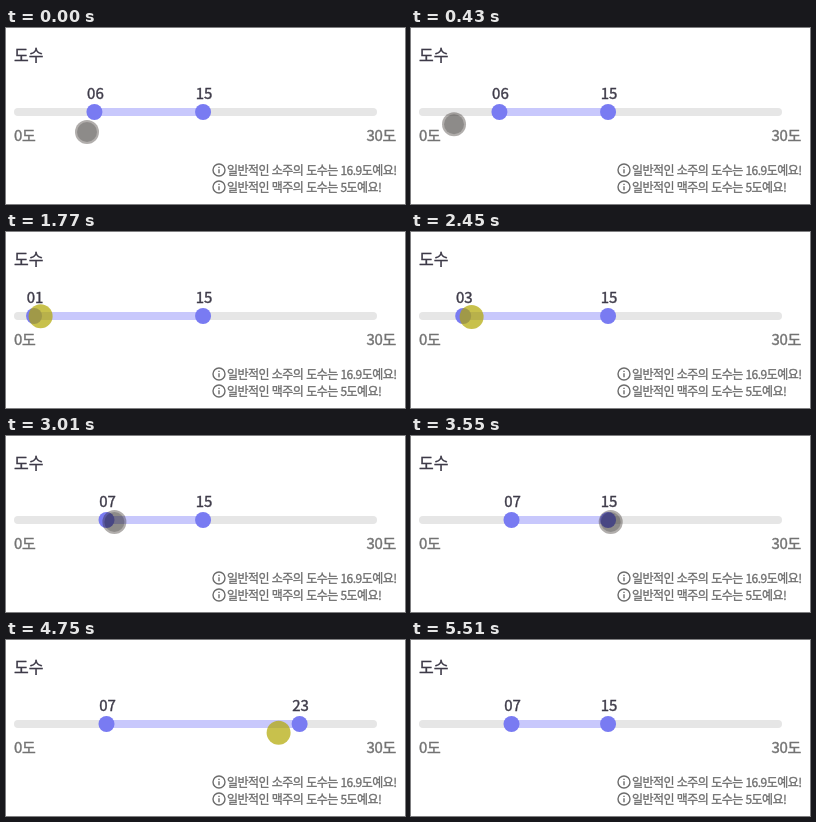
Animation of 399x176 px, one loop 6630 ms. Source, as an HTML page:

```html
<!DOCTYPE html>
<html lang="ko">
<head>
<meta charset="utf-8">
<style>
html, body { margin: 0; width: 100%; height: 100%; overflow: hidden; background: #fff; }
svg { display: block; width: 399px; height: 176px; }
text {
  font: 500 15px "Noto Sans CJK KR", "Noto Sans CJK", "Noto Sans KR", sans-serif;
  fill: #3e3b49; stroke: #3e3b49; stroke-width: .4px;
}
.title { font-size: 16px; }
.limit { fill: #737373; stroke: #737373; letter-spacing: -.02em; }
.hint text { font-size: 12px; fill: #6c6c6c; stroke: #6c6c6c; stroke-width: .3px; letter-spacing: -.045em; }
.value { text-anchor: middle; }
</style>
</head>
<body>
<svg viewBox="0 0 399 176">
  <defs>
    <g id="info" fill="none" stroke="#6c6c6c" stroke-width="1.4">
      <circle r="6"/>
      <path d="M0-.8V3.2M0-3.2V-1.9"/>
    </g>
  </defs>
  <text class="title" x="8" y="32.5">도수</text>
  <rect x="8" y="80" width="363" height="8" rx="4" fill="#e6e6e6"/>
  <rect id="range" y="80" height="8" fill="#c8c8fc"/>
  <g fill="#797bf2">
    <circle id="minThumb" cy="84" r="8"/>
    <circle id="maxThumb" cy="84" r="8"/>
  </g>
  <text id="minText" class="value" y="71"></text>
  <text id="maxText" class="value" y="71"></text>
  <text class="limit" x="8" y="112.5">0도</text>
  <text class="limit" x="360.5" y="112.5">30도</text>
  <g class="hint">
    <use href="#info" x="213" y="142"/>
    <text x="221" y="146.5">일반적인 소주의 도수는 16.9도예요!</text>
    <use href="#info" x="213" y="159"/>
    <text x="221" y="163.5">일반적인 맥주의 도수는 5도예요!</text>
  </g>
  <g id="cursor">
    <circle id="ring" r="12"/>
    <circle id="core" r="10"/>
  </g>
</svg>
<script>
const LOOP = 6630, ORIGIN = 16, UNIT = 12.07;
const $ = id => document.getElementById(id);
const clamp = (v, lo, hi) => Math.min(hi, Math.max(lo, v));
const easeOut = u => 1 - (1 - u) ** 2.5;

const home = { x: 81, y: 104 };
const moves = [
  { from: 20, to: 340, x: 16, y: 106 },
  { from: 340, to: 750, x: 74, y: 85 },
  { from: 890, to: 1470, x: 96, y: 85 },
  { from: 1580, to: 2030, x: 14, y: 84 },
  { from: 2300, to: 2930, x: 108, y: 86 },
  { from: 3010, to: 3610, x: 200, y: 86 },
  { from: 3690, to: 4210, x: 380, y: 101 },
  { from: 4550, to: 5210, x: 200, y: 87 }
];

// The thumb trails the pointer by lag; grip is where it was grabbed
const drags = {
  min: { from: 1570, to: 2970, grip: 7, lag: 20 },
  max: { from: 3690, to: 5410, grip: 3, lag: 50 }
};

function pointer(t) {
  let { x, y } = home;
  for (const m of moves) {
    const e = easeOut(clamp((t - m.from) / (m.to - m.from), 0, 1));
    x += (m.x - x) * e;
    y += (m.y - y) * e;
  }
  return { x, y };
}

function valueAt(t, { from, to, grip, lag }) {
  const { x } = pointer(clamp(t - lag, from, to));
  return clamp(Math.round((x - grip - ORIGIN) / UNIT), 0, 30);
}

function place(name, value) {
  const x = ORIGIN + value * UNIT;
  $(name + "Thumb").setAttribute("cx", x);
  $(name + "Text").setAttribute("x", x + 1);
  $(name + "Text").textContent = String(value).padStart(2, "0");
  return x;
}

function render(t) {
  const left = place("min", valueAt(t, drags.min));
  const right = place("max", valueAt(t, drags.max));
  $("range").setAttribute("x", left);
  $("range").setAttribute("width", Math.max(0, right - left));

  const { x, y } = pointer(t);
  const pressed = Object.values(drags).some(d => t >= d.from && t < d.to);
  $("ring").setAttribute("fill", pressed ? "rgba(176,166,0,.7)" : "rgba(40,30,24,.36)");
  $("core").setAttribute("fill", pressed ? "none" : "rgba(0,0,0,.2)");
  $("cursor").setAttribute("transform", `translate(${x} ${y})`);
  $("cursor").setAttribute("opacity", clamp((5490 - t) / 80, 0, 1));
}

const start = performance.now();
function frame() {
  render((performance.now() - start) % LOOP);
  requestAnimationFrame(frame);
}
render(0);
requestAnimationFrame(frame);
</script>
</body>
</html>
```
